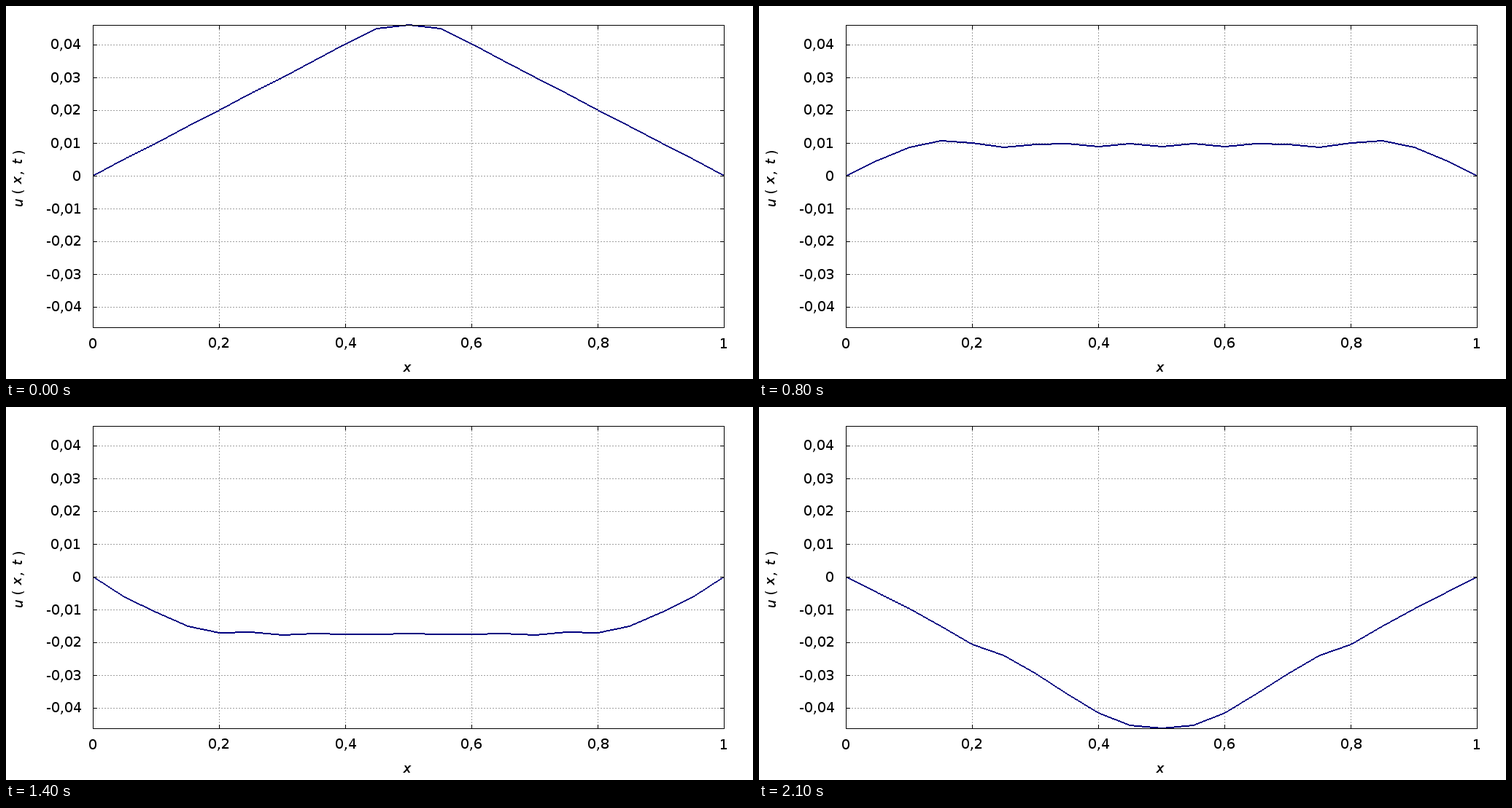
A matplotlib script for the animation above (2200 ms loop, 1024 by 512 pixels).

```python
import numpy as np
import matplotlib.pyplot as plt
from matplotlib.animation import FuncAnimation

W, H, DPI = 1024, 512, 64
PX = 72 / DPI                      # one pixel in points
LEFT, RIGHT, TOP, BOTTOM = 119, 984, 26, 441
FRAMES, SUBSTEPS, CELLS = 22, 5, 20
SIZE = 18.67 * PX
TICK = 5

plt.rcParams.update({
    "font.family": "DejaVu Sans",
    "text.hinting": "native",
    "text.hinting_factor": 1,
})


def plucked_string():
    """Displacement of a plucked string, one row per frame."""
    c2, dt, h = 0.2, 0.02, 1 / CELLS
    x = np.linspace(0, 1, CELLS + 1)
    u = 0.1 * np.minimum(x, 1 - x)
    v = np.zeros_like(u)
    rows = []
    for _ in range(FRAMES):
        for _ in range(SUBSTEPS):
            v[1:-1] += dt * c2 * (u[2:] - 2 * u[1:-1] + u[:-2]) / h**2
            u = u + dt * v
        rows.append(u)
    return x, np.array(rows)


xs, waves = plucked_string()
lo, hi = waves.min(), waves.max()
node_x = np.round(LEFT + (RIGHT - LEFT) * xs)
node_y = np.round(TOP + (BOTTOM - TOP) * (hi - waves) / (hi - lo))
columns = np.arange(LEFT, RIGHT + 1)

fig = plt.figure(figsize=(W / DPI, H / DPI), dpi=DPI, facecolor="white")
ax = fig.add_axes([0, 0, 1, 1])
ax.set_xlim(0, W)
ax.set_ylim(H, 0)
ax.axis("off")


def stroke(x, y, color, z, dashed):
    ax.plot(x, y, color=color, lw=PX, snap=False, zorder=z,
            solid_capstyle="butt", dash_capstyle="butt",
            linestyle=(0, (2, 2)) if dashed else "-")


def hline(y, x0, x1, color="black", z=4, dashed=False):
    stroke([x0, x1 + 1], [y + 0.5, y + 0.5], color, z, dashed)


def vline(x, y0, y1, color="black", z=4, dashed=False):
    stroke([x + 0.5, x + 0.5], [y1 + 1, y0], color, z, dashed)


def label(x, y, s, **kw):
    ax.text(x, y, s, fontsize=SIZE, color="black", va="baseline", **kw)


def comma(value, digits):
    return f"{value:.{digits}f}".replace(".", ",") if value else "0"


for i in range(-4, 5):
    y = 233 - 45 * i
    hline(y, LEFT, RIGHT, "#a0a0a0", 1, True)
    hline(y, LEFT, LEFT + TICK)
    hline(y, RIGHT - TICK, RIGHT)
    label(103.5, y + 6.5, comma(i / 100, 2), ha="right")

for i in range(6):
    x = LEFT + 173 * i
    vline(x, TOP, BOTTOM, "#a0a0a0", 1, True)
    vline(x, TOP, TOP + TICK)
    vline(x, BOTTOM - TICK, BOTTOM)
    label(x + 0.5, 469.5, "1" if i == 5 else comma(i / 5, 1), ha="center")

for x in (LEFT, RIGHT):
    vline(x, TOP, BOTTOM)
for y in (TOP, BOTTOM):
    hline(y, LEFT, RIGHT)

label(550, 502, "x", ha="center", style="italic")
for s, y in zip("u(x,t)", (267.5, 252, 239, 227, 213, 198)):
    label(22, y, s, ha="center", rotation=90, rotation_mode="anchor",
          style="italic" if s.isalpha() else "normal")

# The curve is two whole pixels tall in every column.
curve = ax.stairs(np.zeros(len(columns)), np.append(columns, RIGHT + 1),
                  baseline=np.zeros(len(columns)), fill=True,
                  color="#000080", lw=0, snap=False, zorder=3)
ax.set_xlim(0, W)
ax.set_ylim(H, 0)


def draw(n):
    row = np.round(np.interp(columns, node_x, node_y[n]))
    curve.set_data(values=row - 1, baseline=row + 1)
    return curve,


anim = FuncAnimation(fig, draw, frames=FRAMES, interval=100, repeat=True,
                     repeat_delay=0, blit=False)
plt.show()
```
